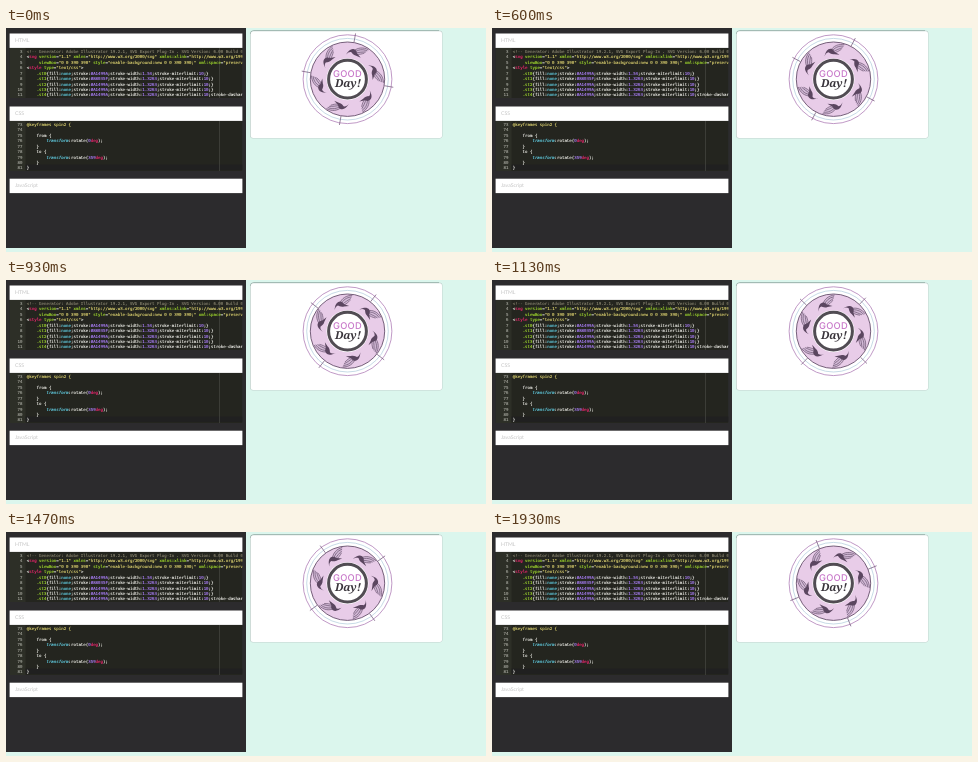
These frames come from a looping animation (480 by 224 pixels, 1990 ms). An HTML page:

```html
<!DOCTYPE html>
<html lang="en">
<head>
<meta charset="utf-8">
<title>Good Day badge</title>
<style>
  html, body { margin: 0; width: 480px; height: 224px; overflow: hidden; background: #dbf6ed; }
  svg { display: block; }
  text { white-space: pre; text-rendering: geometricPrecision; }
  .code text { font: 4.09px "DejaVu Sans Mono", monospace; color: #f8f8f2; }
  .code text, .code tspan { fill: currentColor; stroke: currentColor; stroke-width: .12; }
  .code .num { color: #a3a49b; text-anchor: end; }
  .label { font: 5.2px Lato, sans-serif; fill: #c4c4c4; }
  .tag, .unit { color: #f92672; }
  .attr, .sel { color: #a6e22e; }
  .str { color: #e6db74; }
  .prop { color: #66d9ef; font-style: italic; }
  .const { color: #66d9ef; }
  .val { color: #ae81ff; }
  .rem { color: #88846f; }
</style>
</head>
<body>
<svg width="480" height="224" viewBox="0 0 480 224">
  <defs>
    <clipPath id="pane"><rect x="3.600" y="20" width="232.800" height="123"/></clipPath>
    <g id="bird">
      <path d="M-3 0C0-5 5-7 11-6C10-3 6 1 0 2Z" fill="#d3bad7"/>
      <path d="M-3 0C0-5 5-7 11-6M-2 1C1-3 5-5 10-4.500M-1 1.500C3-1 6-2 9-3M0 2C3 2 6 0 8-1.500" fill="none" stroke="#69536f" stroke-width=".65"/>
      <path d="M-9 5.500C-8 1-6-2-3-2C-1-2 0-1 1 1L6 4L1 3.500C-2 4-4 2-5 1.500C-7 2-8 3-9 5.500Z" fill="#5b4660"/>
    </g>
  </defs>
  <rect width="240" height="220" fill="#2c2b2d"/>
  <g id="editor"></g>
  <rect x="244" y="2.500" width="192.500" height="108" rx="3" fill="#c3d3cf"/>
  <path d="M244.500 6Q244.500 2.700 248 2.700H433" fill="none" stroke="#8ba59d" stroke-width=".8"/>
  <rect x="244.800" y="3.200" width="191.200" height="106.800" rx="2.500" fill="#fff"/>
  <g transform="translate(341.5 51.2)" fill="none">
    <circle r="44.400" stroke="#b07fb8" stroke-width=".8"/>
    <circle r="40.800" stroke="#a9c8d8" stroke-width=".65"/>
    <circle r="37.200" fill="#e8cce8" stroke="#67506c" stroke-width=".9"/>
    <g id="birds"></g>
    <g id="ticks" stroke="#765a7d" stroke-width=".7"></g>
    <circle r="21" fill="#fff"/>
    <circle r="18.900" stroke="#514c53" stroke-width="3"/>
    <text y="-2.700" text-anchor="middle" font-family="Inter, sans-serif" font-size="9.300" font-weight="500" letter-spacing=".25" fill="#c878c9">GOOD</text>
    <text x=".5" y="7.300" text-anchor="middle" font-family="'Noto Serif', serif" font-size="10.900" font-weight="700" font-style="italic" fill="#39343b">Day!</text>
  </g>
</svg>
<script>
const $ = id => document.getElementById(id);
const esc = s => s.replace(/&/g, '&amp;').replace(/</g, '&lt;');
const span = (kind, s) => `<tspan class="${kind}">${esc(s)}</tspan>`;
const tag = name => '&lt;' + span('tag', name);
const attr = (name, value) => ' ' + span('attr', name) + '=' + span('str', `"${value}"`);

const rule = (n, width, tail = '') => '    ' + span('sel', '.st' + n) + '{fill:' +
  span('const', 'none') + ';stroke:' + span('val', n === 1 ? '#88035F' : '#A1499A') +
  ';stroke-width:' + span('val', width) + ';stroke-miterlimit:' + span('val', '10') + ';' + tail + '}';
const turn = deg => '        ' + span('prop', 'transform') + ':rotate(' +
  span('val', deg) + span('unit', 'deg') + ');';

const html = [
  span('rem', '<!-- Generator: Adobe Illustrator 19.2.1, SVG Export Plug-In . SVG Version: 6.00 Build 0)'),
  tag('svg') + attr('version', '1.1') + attr('xmlns', 'http://www.w3.org/2000/svg') +
    attr('xmlns:xlink', 'http://www.w3.org/1999/xlink'),
  '    ' + attr('viewBox', '0 0 390 390') + attr('style', 'enable-background:new 0 0 390 390;') + attr('xml:space', 'preserve'),
  tag('style') + attr('type', 'text/css') + '&gt;',
  rule(0, '1.54'), rule(1, '1.3263'), rule(2, '1.3263'), rule(3, '1.3263'),
  rule(4, '1.3263', 'stroke-dasharray:4')
];
const css = [
  span('str', '@keyframes spin2 {'), '', '    from {', turn('0'), '    }',
  '    to {', turn('359'), '    }', '}'
];

const box = (x, y, w, h, fill) => `<rect x="${x}" y="${y}" width="${w}" height="${h}" fill="${fill}"/>`;
const bar = (y, label) => box(3.6, y, 232.8, 14.4, '#fff') +
  `<text class="label" x="9" y="${y + 8.7}">${label}</text>`;
const pane = (y, first, lines, active = '') =>
  `<g class="code" clip-path="url(#pane)">` + box(3.6, y, 232.8, 50, '#24251f') +
  box(3.6, y, 16, 50, '#2d2f27') + active + box(213, y, 0.5, 50, '#555651') +
  lines.map((line, i) => {
    const base = y + 5 + i * 5.42;
    return `<text class="num" x="16.500" y="${base}">${first + i}</text><text x="20.800" y="${base}">${line}</text>`;
  }).join('') + '</g>';

$('editor').innerHTML = bar(5.5, 'HTML') + pane(20, 3, html) +
  bar(78.5, 'CSS') + pane(93, 73, css, box(19.6, 136.5, 217, 5.4, '#202020')) + bar(150.7, 'JavaScript');

const around = (count, part) => Array.from({ length: count },
  (_, i) => `<g transform="rotate(${i * 360 / count})">${part}</g>`).join('');
$('birds').innerHTML = around(6, '<use href="#bird" transform="translate(0 -28.500)"/>');
$('ticks').innerHTML = around(4, '<path d="M37.500 0H46.500"/>');

const LOOP = 1990, FPS = 15, STEP = 2;

function draw(now) {
  const t = Math.floor(now % LOOP / 10) + 0.5;
  const step = Math.min(29, Math.floor(t * FPS / 100));
  $('ticks').setAttribute('transform', `rotate(${10 + step * STEP})`);
  $('birds').setAttribute('transform', `rotate(${18 - step * STEP})`);
}

const start = performance.now();
function tick() {
  draw(performance.now() - start);
  requestAnimationFrame(tick);
}
draw(0);
requestAnimationFrame(tick);
</script>
</body>
</html>
```
